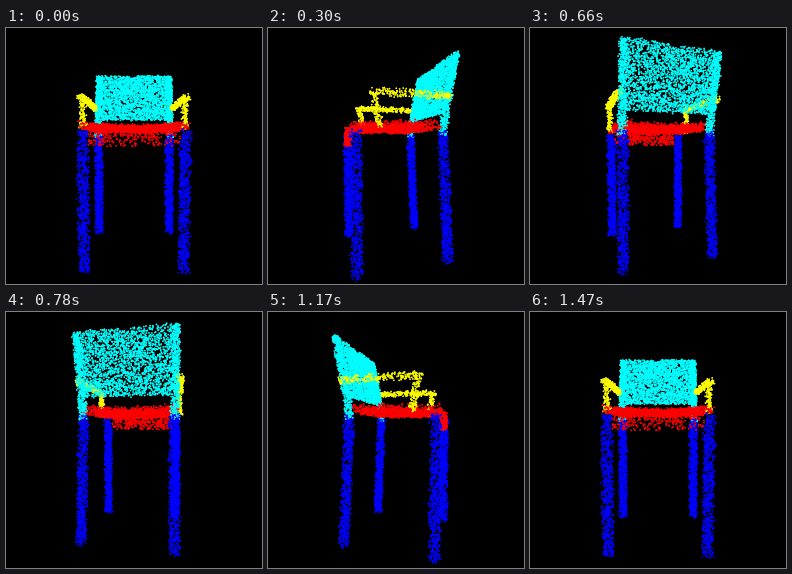
Write a matplotlib script that moves like this. It is 256x256 px and loops after 1.5 s.

```python
import numpy as np
import matplotlib.pyplot as plt
from matplotlib.animation import FuncAnimation

SIZE = 256
DPI = 100
FRAMES = 50
INTERVAL = 30
FOCAL = SIZE / 2 / np.tan(np.radians(30))   # 60 degree field of view
ELEV = 0.055                                # camera elevation in radians
RADIUS = 1.28                               # splat radius in pixels
LAYERS = 8                                  # splats blended per pixel

CYAN, RED, YELLOW, BLUE = (0, 1, 1), (1, 0, 0), (1, 1, 0), (0, 0, 1)

rng = np.random.default_rng(7)


def rod(start, end, radius, count):
    """Points filling a round bar between two ends."""
    start, end = np.array(start, float), np.array(end, float)
    axis = (end - start) / np.linalg.norm(end - start)
    helper = (1, 0, 0) if abs(axis[0]) < 0.9 else (0, 1, 0)
    u = np.cross(axis, helper)
    u /= np.linalg.norm(u)
    w = np.cross(axis, u)
    t = rng.random((count, 1))
    phi = rng.uniform(0, 2 * np.pi, (count, 1))
    rad = radius * np.sqrt(rng.random((count, 1)))
    return start + t * (end - start) + rad * (np.cos(phi) * u + np.sin(phi) * w)


def seat(count):
    """Dished slab, wider at the front and higher at the back."""
    y = rng.uniform(-28, 47, count)
    half = 42.5 + 1.5 * (y + 28) / 75
    x = rng.uniform(-1, 1, count) * half
    top = 29.5 + 3 * (x / 44) ** 2 - 0.05 * y
    z = 24 + (top - 24) * rng.random(count)
    return np.column_stack([x, y, z])


def apron(count):
    x = rng.uniform(-36, 36, count)
    y = rng.normal(47, 0.5, count)
    z = rng.uniform(10.5, 24, count)
    return np.column_stack([x, y, z])


def backrest(count):
    """Panel leaning backwards."""
    x = rng.uniform(-44, 44, count)
    z = rng.uniform(39, 91, count)
    y = -32 - 10 * (z - 39) / 52 + rng.uniform(-1.5, 1.5, count)
    return np.column_stack([x, y, z])


def build_chair():
    parts = [(seat(1900), RED), (apron(330), RED), (backrest(2900), CYAN)]
    for side in (-1, 1):
        parts += [
            (rod((41 * side, 44, -93), (41 * side, 44, 23), 4.7, 750), BLUE),
            (rod((41.5 * side, -36, -93), (40 * side, -30, 23), 4.7, 750), BLUE),
            (rod((40.5 * side, -30, 20), (40.5 * side, -32, 39), 3.7, 120), CYAN),
            (rod((40.5 * side, -32, 39), (40.5 * side, -42, 90.5), 3.2, 250), CYAN),
            (rod((44.5 * side, 34, 52), (44 * side, -37, 52.5), 3.2, 230), YELLOW),
            (rod((44 * side, 30.5, 51), (44 * side, 26, 25), 3, 110), YELLOW),
        ]
    points = np.vstack([p for p, _ in parts])
    colors = np.vstack([np.tile(c, (len(p), 1)) for p, c in parts])
    return points + rng.normal(0, 0.45, points.shape), colors


def project(points, angle):
    """Return pixel positions and depth for a turn about the upright axis."""
    x, y, z = points.T
    side = x * np.cos(angle) - y * np.sin(angle)
    near = x * np.sin(angle) + y * np.cos(angle)
    depth = 1 - (near * np.cos(ELEV) + z * np.sin(ELEV)) / FOCAL
    up = z * np.cos(ELEV) - near * np.sin(ELEV)
    pos = np.column_stack([SIZE / 2 + side / depth, SIZE / 2 - up / depth])
    return pos, depth


STEPS = np.array([(dx, dy) for dy in (-1, 0, 1) for dx in (-1, 0, 1)])


def render(pos, depth, colors):
    """Blend soft round splats front to back on black."""
    order = np.argsort(depth)
    pos, colors = pos[order], colors[order]
    cells = np.floor(pos).astype(int)[:, None] + STEPS
    dist2 = ((cells + 0.5 - pos[:, None]) ** 2).sum(axis=2)
    alpha = 1 - dist2 / RADIUS ** 2
    hit = (alpha > 0) & ((cells >= 0) & (cells < SIZE)).all(axis=2)
    owner = np.nonzero(hit)[0]
    alpha = alpha[hit]
    pixel = cells[hit][:, 1] * SIZE + cells[hit][:, 0]

    # a stable sort keeps the nearest splat first inside each pixel
    by_pixel = np.argsort(pixel, kind="stable")
    pixel, owner, alpha = pixel[by_pixel], owner[by_pixel], alpha[by_pixel]
    rank = np.arange(len(pixel)) - np.searchsorted(pixel, pixel)

    image = np.zeros((SIZE * SIZE, 3))
    light = np.ones(SIZE * SIZE)
    for layer in range(LAYERS):
        pick = rank == layer
        p, a = pixel[pick], alpha[pick]
        image[p] += (light[p] * a)[:, None] * colors[owner[pick]]
        light[p] *= 1 - a
    return image.reshape(SIZE, SIZE, 3)


points, colors = build_chair()

fig = plt.figure(figsize=(SIZE / DPI, SIZE / DPI), dpi=DPI, facecolor="black")
ax = fig.add_axes([0, 0, 1, 1])
ax.axis("off")
picture = ax.imshow(np.zeros((SIZE, SIZE, 3)), interpolation="nearest",
                    aspect="auto")


def update(frame):
    # first and last frames share the same pose
    pos, depth = project(points, 2 * np.pi * frame / (FRAMES - 1))
    picture.set_data(np.clip(render(pos, depth, colors), 0, 1))
    return (picture,)


anim = FuncAnimation(fig, update, frames=FRAMES, interval=INTERVAL,
                     repeat=True, repeat_delay=0, blit=False)
plt.show()
```
